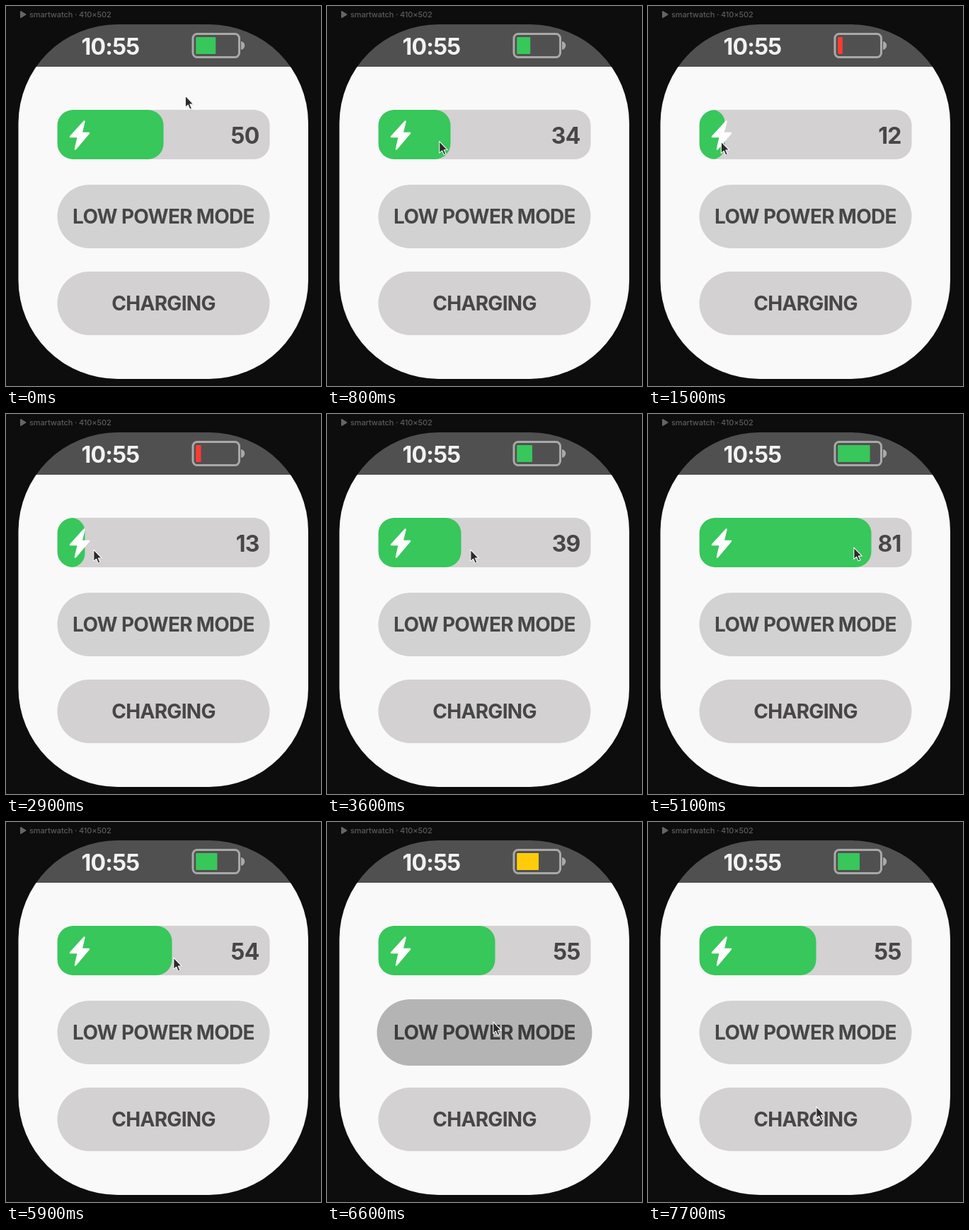
Write an HTML page that moves like this. It is 445 px wide and 538 px high and loops after 8 s.

```html
<!DOCTYPE html>
<html lang="en">
<head>
<meta charset="utf-8">
<title>Smartwatch battery</title>
<style>
  html, body { margin: 0; width: 100%; height: 100%; overflow: hidden; background: #0d0d0d; }
  svg { display: block; }
  text {
    font-family: Inter, "Liberation Sans", sans-serif;
    font-weight: 700;
    font-optical-sizing: none;
    letter-spacing: -.025em;
    fill: #474747;
  }
  .big { font-size: 32px; }
  .action { font-size: 28px; text-anchor: middle; }
  .caption { font-size: 11px; font-weight: 500; letter-spacing: -.01em; fill: #5c5c5c; }
  .soft { fill: #d3d1d2; }
</style>
</head>
<body>
<svg width="445" height="538" viewBox="0 0 445 538">
  <defs>
    <clipPath id="face"><rect x="17.5" y="26" width="409.5" height="502" rx="140"/></clipPath>
    <clipPath id="track"><rect x="72.5" y="147" width="300" height="70" rx="22"/></clipPath>
  </defs>

  <path d="M21 8L27.5 12L21 16Z" fill="#666" stroke="#666" stroke-width="2" stroke-linejoin="round"/>
  <text class="caption" x="33" y="16">smartwatch · 410×502</text>

  <g clip-path="url(#face)">
    <rect x="17" y="26" width="411" height="60" fill="#505050"/>
    <rect x="17" y="86" width="411" height="442" fill="#f9f9f9"/>
  </g>

  <text class="big" x="147.5" y="69" text-anchor="middle" style="fill:#f2f2f2">10:55</text>
  <rect x="264" y="39.5" width="65.5" height="33" rx="6" fill="none" stroke="#a9a9a9" stroke-width="3"/>
  <path d="M332 50C339 51 339 61 332 62Z" fill="#a9a9a9"/>
  <rect id="charge" x="268.2" y="44" height="24" rx="1"/>

  <rect class="soft" x="72.5" y="147" width="300" height="70" rx="22"/>
  <g clip-path="url(#track)"><rect id="level" x="72.5" y="147" height="70" fill="#37c75a"/></g>
  <path d="M110.5 163.5L91 185H102L98 202.5L117 180H106.5Z" fill="#fff" stroke="#fff" stroke-width="2.6" stroke-linejoin="round"/>
  <text class="big" id="count" x="357.5" y="195" text-anchor="end"></text>

  <rect id="saver"/>
  <text class="action" id="saverText" x="222.5" y="308">LOW POWER MODE</text>
  <rect class="soft" x="72.5" y="376" width="300" height="90" rx="45"/>
  <text class="action" x="222.5" y="431">CHARGING</text>

  <g id="cursor" stroke-linejoin="round">
    <path d="M0 1V17L4 14L6.6 19.5L9.4 18.2L7 12.8H12Z" fill="#000" opacity=".18"/>
    <path d="M.3 .5V15.8L3.8 12.7L6.3 18.2L8.8 17.1L6.3 11.7H11Z" fill="#2b2b2b" stroke="#fff"/>
  </g>
</svg>
<script>
  const LOOP = 8000, STEP = 100;
  const GRAB = 400, DROP = 5900, LAG = 100;   // slider drag
  const SAVE_ON = 6600, SAVE_OFF = 7400;      // button clicks
  const LEFT = 72.5, UNIT = 3;                // slider origin, pixels per percent

  // Hand positions at the turns of the gesture
  const path = [
    { t: 0, x: 254, y: 127 },
    { t: GRAB, x: 222.5, y: 184 },
    { t: 900, x: 147, y: 192 },
    { t: 1500, x: 104, y: 192 },
    { t: 1800, x: 100, y: 192 },
    { t: 2400, x: 74, y: 192 },
    { t: 2900, x: 124.5, y: 192 },
    { t: 3600, x: 203.5, y: 192 },
    { t: 4700, x: 391, y: 189 },
    { t: 5100, x: 291.5, y: 189 },
    { t: 5600, x: 231, y: 190 },
    { t: DROP, x: 237.5, y: 192 },
    { t: 6400, x: 235.5, y: 283 },
    { t: SAVE_OFF, x: 235.5, y: 283 },
    { t: 7700, x: 238.5, y: 403 }
  ];

  const $ = id => document.getElementById(id);
  const clamp = (v, lo, hi) => Math.min(hi, Math.max(lo, v));
  const mix = (a, b, k) => a + (b - a) * k;
  const gray = (a, b, k) => `rgb(${[0, 0, 0].fill(Math.round(mix(a, b, k)))})`;
  const set = (el, attrs) => {
    for (const key in attrs) el.setAttribute(key, attrs[key]);
  };

  // Speed through a point; zero where the motion turns or rests
  function speed(i, axis) {
    const a = path[i - 1], b = path[i], c = path[i + 1];
    if (!a || !c) return 0;
    const before = (b[axis] - a[axis]) / (b.t - a.t);
    const after = (c[axis] - b[axis]) / (c.t - b.t);
    return before * after > 0 ? 2 * before * after / (before + after) : 0;
  }

  // Monotone cubic curve through the path
  function hand(t, axis) {
    const i = path.findIndex(p => p.t > t);
    if (i < 0) return path[path.length - 1][axis];
    const a = path[i - 1], b = path[i], span = b.t - a.t;
    const u = (t - a.t) / span, v = 1 - u;
    return a[axis] * v * v * (1 + 2 * u) + b[axis] * u * u * (1 + 2 * v)
      + span * u * v * (speed(i - 1, axis) * v - speed(i, axis) * u);
  }

  const pulse = (t, center) => clamp(1 - Math.abs(t - center) / 200, 0, 1);

  function draw(t) {
    const dragX = hand(clamp(t - LAG, GRAB, DROP), "x");
    const value = clamp(Math.round((dragX - LEFT) / UNIT), 0, 100);
    const width = value * UNIT;
    const saving = t >= SAVE_ON && t < SAVE_OFF;
    const color = saving ? "#ffcc0a" : value <= 20 ? "#ff3b30" : "#37c75a";

    set($("charge"), { width: value * .56, fill: color });
    set($("level"), { width, rx: Math.min(22, width / 2), ry: Math.min(22, width / 2) });
    $("count").textContent = value;

    const k = pulse(t, SAVE_ON) + pulse(t, SAVE_OFF), grow = 2 * k;
    set($("saver"), {
      x: LEFT - grow, y: 253 - grow, width: 300 + 2 * grow, height: 90 + 2 * grow,
      rx: 45 + grow, fill: gray(210, 180, k)
    });
    $("saverText").style.fill = gray(71, 61, k);
    set($("cursor"), {
      transform: `translate(${hand(t, "x") - 1} ${hand(t, "y") - .5}) scale(1.08)`
    });
  }

  // The picture advances in 100 ms steps
  function tick() {
    const t = performance.now() % LOOP;
    draw(Math.floor(t / STEP) * STEP);
    requestAnimationFrame(tick);
  }
  tick();
</script>
</body>
</html>
```
